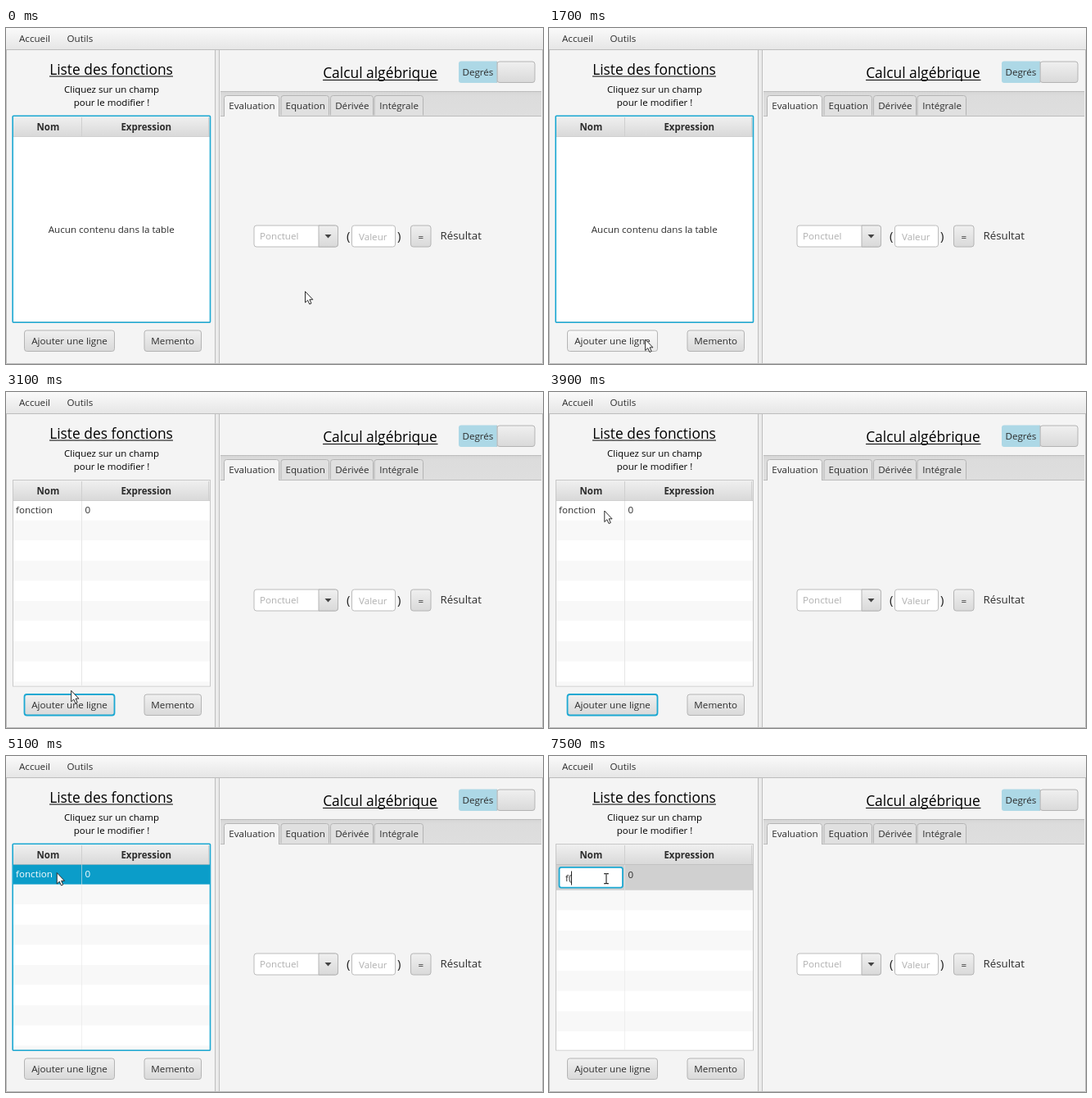
An HTML page that plays this animation: 656 px wide and 410 px high, repeating every 8000 ms.

```html
<!DOCTYPE html>
<html lang="fr">
<head>
<meta charset="utf-8">
<title>Calcul algébrique</title>
<style>
  html, body { margin: 0; width: 100%; height: 100%; overflow: hidden; background: #f4f4f4; }
  svg { display: block; width: 656px; height: 410px; }
  text { font: 11.65px "Open Sans", "Noto Sans", sans-serif; fill: #2c2c2c; white-space: pre; }
  .mid { text-anchor: middle; }
  .title { font-size: 17.4px; fill: #000; }
  .hint { font-size: 11.5px; fill: #000; }
  .head { font-size: 11.5px; font-weight: 700; }
  .tab { font-size: 11.6px; }
  .big { font-size: 13.3px; }
  .paren { font-size: 15px; fill: #222; }
  .prompt { fill: #b0b0b0; }
  .btn { fill: url(#face); stroke: #b4b4b4; }
  .btn.hover { fill: url(#lit); }
  .btn.press { fill: url(#down); }
  .btn.focus { stroke: #1ba8d2; stroke-width: 1.8; }
  .field { fill: #fff; stroke: #bcbcbc; }
  .line { stroke: #bdbdbd; fill: none; }
  .ring { fill: none; stroke: #1ba8d2; }
</style>
</head>
<body>
<svg viewBox="0 0 656 410">
  <defs>
    <linearGradient id="bar" x2="0" y2="1"><stop stop-color="#fafafa"/><stop offset="1" stop-color="#e6e6e6"/></linearGradient>
    <linearGradient id="face" x2="0" y2="1"><stop stop-color="#f0f0f0"/><stop offset="1" stop-color="#d9d9d9"/></linearGradient>
    <linearGradient id="lit" x2="0" y2="1"><stop stop-color="#f9f9f9"/><stop offset="1" stop-color="#eaeaea"/></linearGradient>
    <linearGradient id="down" x2="0" y2="1"><stop stop-color="#d6d6d6"/><stop offset="1" stop-color="#c9c9c9"/></linearGradient>
    <linearGradient id="strip" x2="0" y2="1"><stop stop-color="#d5d5d5"/><stop offset=".2" stop-color="#dcdcdc"/><stop offset="1" stop-color="#dedede"/></linearGradient>
    <clipPath id="body"><rect x="9" y="132" width="240" height="226.5"/></clipPath>
  </defs>

  <rect width="656" height="410" fill="#f4f4f4"/>
  <rect width="656" height="26" fill="url(#bar)"/>
  <path class="line" d="M0 26.5H656M.5 26V409.5H655.5V26"/>
  <text x="16" y="16.6">Accueil</text>
  <text x="74.5" y="16.6">Outils</text>

  <rect x="256" y="27" width="5" height="382" fill="#ebebeb"/>
  <path class="line" d="M255.5 27V409M260.5 27V409"/>

  <text class="title mid" x="128.5" y="56.6">Liste des fonctions</text>
  <path d="M53 59H204M387 63.5H527.5" stroke="#000" stroke-width="1.2"/>
  <text class="hint mid" x="129" y="79">Cliquez sur un champ</text>
  <text class="hint mid" x="129" y="95.3">pour le modifier !</text>

  <rect x="8.5" y="107.5" width="241" height="251.5" fill="#fff" stroke="#c8c8c8"/>
  <g id="empty"><text class="mid" x="128.7" y="249.5">Aucun contenu dans la table</text></g>
  <g id="filled" clip-path="url(#body)">
    <g id="stripes"></g>
    <rect id="select" x="9" y="132" width="240"/>
    <path id="column" d="M92.5 132V359" stroke="#e6e6e6"/>
    <text id="name" x="12" y="148">fonction</text>
    <text id="expr" x="96.5"></text>
  </g>
  <rect x="9" y="108" width="240" height="24" fill="url(#face)"/>
  <path class="line" d="M9 132.5H249" stroke-opacity=".7"/>
  <path d="M92.5 109V132M247.5 109V132" stroke="#cfcfcf"/>
  <text class="head mid" x="51.3" y="124.5">Nom</text>
  <text class="head mid" x="171.3" y="124.5">Expression</text>
  <rect id="tableRing" class="ring" x="8.2" y="107.3" width="241.3" height="252" rx="1" stroke-width="1.6"/>

  <g id="editor">
    <rect class="ring" x="12.5" y="135.8" width="77.5" height="24.8" rx="2.5" stroke-width="1.8" style="fill:#fff"/>
    <rect id="mark" x="20" y="140.5" width="45.5" height="17" fill="#0b9dc9"/>
    <text id="typed" x="20" y="153"></text>
    <path id="caret" d="M0 140.5V157.5" stroke="#222"/>
  </g>

  <rect id="add" class="btn" x="22.5" y="369" width="110" height="25.5" rx="3"/>
  <text class="mid" x="77.5" y="386">Ajouter une ligne</text>
  <rect class="btn" x="169" y="369" width="69.5" height="25.5" rx="3"/>
  <text class="mid" x="203.7" y="386">Memento</text>

  <text class="title mid" x="456.9" y="60.5">Calcul algébrique</text>
  <rect x="600" y="41" width="46" height="25.5" rx="3" class="btn"/>
  <path d="M600 40.5V67H556a3 3 0 0 1-3-3V43.5a3 3 0 0 1 3-3z" fill="#add8e6"/>
  <path class="line" d="M600 41V66.5"/>
  <text class="mid" x="576.4" y="58">Degrés</text>

  <rect x="262" y="77" width="392" height="30" fill="url(#strip)"/>
  <path class="line" d="M262 77.5H654M262 107.5H654"/>
  <g id="tabs"></g>

  <rect class="field" x="303" y="241" width="102.5" height="26" rx="3"/>
  <path class="btn" d="M382 241H402.5a3 3 0 0 1 3 3V264a3 3 0 0 1-3 3H382z"/>
  <path d="M389.5 252H397.5L393.5 256.5z" fill="#444"/>
  <text class="prompt" x="310" y="258">Ponctuel</text>
  <text class="paren" x="416" y="258.5">(</text>
  <rect class="field" x="422.5" y="241" width="53" height="26" rx="3"/>
  <text class="prompt" x="431" y="258.5">Valeur</text>
  <text class="paren" x="478" y="258.5">)</text>
  <rect class="btn" x="494.5" y="241" width="24.5" height="26" rx="3"/>
  <text class="mid" x="506.8" y="258.5">=</text>
  <text class="big" x="530.5" y="257.8">Résultat</text>

  <path id="arrow" d="M0 0V13.5L3.1 10.7L5.3 15.5L7.5 14.5L5.4 9.8H9.3z" fill="#fff" stroke="#222" stroke-width=".95"/>
  <path id="beam" d="M-2.8-6H-.8L0-5.4L.8-6H2.8M0-5.4V5.4M-2.8 6H-.8L0 5.4L.8 6H2.8" fill="none" stroke="#222" stroke-width="1.1"/>
</svg>
<script>
const LOOP = 8000, STEP = 100;
const ADD = 2700, SELECT = 4700, EDIT = 5200, BEAM = 5600, TYPE_F = 6900, TYPE_PAREN = 7500;
const $ = id => document.getElementById(id);
const show = (id, on) => $(id).style.display = on ? '' : 'none';
const set = (id, attrs) => { for (const k in attrs) $(id).setAttribute(k, attrs[k]); };

// time, x, y of the pointer
const path = [
  [0, 365.5, 321.5], [200, 365.5, 321.5], [900, 341, 328], [1200, 304.5, 342.5], [1500, 185, 368],
  [1800, 84, 386], [2100, 77.5, 387.5], [3000, 77.5, 387.5], [3300, 84, 318], [3600, 75, 200],
  [3900, 67.8, 145], [4400, 62.2, 142.5], [5500, 62.2, 142.5], [5900, 70, 149.6], [LOOP, 70, 149.6]
];

function pointer(t) {
  const i = path.findIndex(p => p[0] > t);
  const [a, b] = [path[i - 1], path[i]];
  const k = (t - a[0]) / (b[0] - a[0]);
  return [a[1] + (b[1] - a[1]) * k, a[2] + (b[2] - a[2]) * k];
}

$('tabs').innerHTML = [['Evaluation', 266.5, 67], ['Equation', 336, 58.5], ['Dérivée', 396.5, 52], ['Intégrale', 450, 59.5]]
  .map(([label, x, w], i) =>
    `<path d="M${x} ${i ? 106.5 : 108}V85.5a3 3 0 0 1 3-3h${w - 6}a3 3 0 0 1 3 3V${i ? 106.5 : 108}" fill="${i ? '#e0e0e0' : '#f4f4f4'}" stroke="#b4b4b4"/>
     <text class="tab mid" x="${x + w / 2 + .4}" y="99">${label}</text>`).join('');

const ROW = 24.6;
for (let i = 0; i < 10; i++)
  $('stripes').innerHTML += `<rect x="9" y="${i * ROW}" width="240" height="${ROW}" fill="${i % 2 ? '#fff' : '#f8f8f8'}"/>`;
$('expr').textContent = '0';

function draw(t) {
  const added = t >= ADD, selected = t >= SELECT, editing = t >= EDIT;
  const rowH = editing ? 31.8 : ROW;
  show('empty', !added);
  show('filled', added);
  show('tableRing', !added || selected && !editing);
  set('stripes', { transform: `translate(0 ${132 + rowH})` });
  show('select', selected);
  set('select', { height: rowH, fill: editing ? '#d0d0d0' : '#0b9dc9' });
  set('column', { 'stroke-opacity': selected ? .6 : 1 });
  const ink = selected && !editing ? '#fff' : '#2c2c2c';
  $('name').style.fill = $('expr').style.fill = ink;
  show('name', !editing);
  set('expr', { y: editing ? 149.3 : 148 });

  const typing = t >= TYPE_F, paren = t >= TYPE_PAREN;
  show('editor', editing);
  show('mark', !typing);
  $('typed').textContent = paren ? 'f(' : typing ? 'f' : 'fonction';
  $('typed').style.fill = typing ? '#2c2c2c' : '#fff';
  // the caret is in its off phase when editing begins
  const blinkStart = paren ? TYPE_PAREN : typing ? TYPE_F : EDIT - 500;
  show('caret', (t - blinkStart) % 1000 < 500);
  set('caret', { transform: `translate(${paren ? 27.5 : typing ? 24.5 : 66} 0)` });

  const [x, y] = pointer(t);
  const over = x > 22 && x < 133 && y > 368 && y < 395;
  const look = over ? t === ADD - STEP ? ' press' : ' hover' : '';
  set('add', { class: 'btn' + look + (added && !selected ? ' focus' : '') });
  show('arrow', t < BEAM);
  show('beam', t >= BEAM);
  set(t < BEAM ? 'arrow' : 'beam', { transform: `translate(${x} ${y})` });
}

const start = performance.now();
function tick(now) {
  const t = Math.max(0, now - start) % LOOP;
  draw(Math.floor(t / STEP) * STEP);
  requestAnimationFrame(tick);
}
draw(0);
requestAnimationFrame(tick);
</script>
</body>
</html>
```
